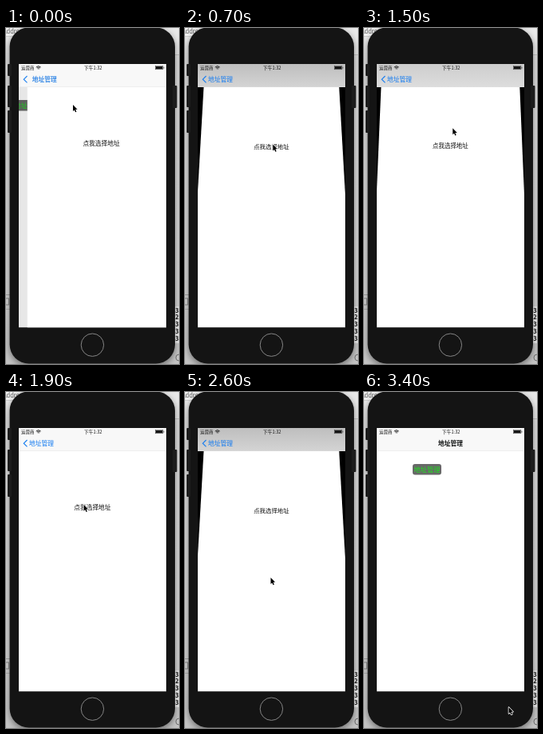
An HTML page with a canvas that plays this animation: 217x420 px, repeating every 3.5 s.

```html
<!DOCTYPE html>
<html lang="zh">
<head>
<meta charset="utf-8">
<style>
html, body { margin: 0; width: 100%; height: 100%; overflow: hidden; background: #dcdcdc; }
canvas { display: block; width: 217px; height: 420px; }
</style>
</head>
<body>
<canvas id="stage"></canvas>
<script>
const W = 217, H = 420, LOOP = 3500, STEP = 100;
const SX = 16, SY = 45, SW = 185, BOTTOM = 374.5, SH = BOTTOM - SY, CX = 108.4, NAV = 74;
const FONT = '"Noto Sans CJK SC", "Noto Sans CJK", sans-serif';
const canvas = document.getElementById('stage');
const ratio = window.devicePixelRatio || 1;
canvas.width = W * ratio;
canvas.height = H * ratio;
const c = canvas.getContext('2d');

const mix = (a, b, k) => a + (b - a) * k;
const clamp = v => Math.min(1, Math.max(0, v));
const smooth = k => k * k * (3 - 2 * k);
const ramp = (t, a, b) => smooth(clamp((t - a) / (b - a)));
const grey = v => `rgb(${[v, v, v].map(Math.round)})`;

// time, x, y of the pointer tip
const path = [
  [0, 84, 96], [100, 85, 98], [500, 110.3, 145.5], [750, 110.3, 145.5],
  [1100, 125, 109.7], [1250, 125, 109.7], [1750, 97.5, 140.7], [1950, 97.5, 140.7],
  [2200, 110.5, 208], [2450, 107.5, 232], [2600, 107.5, 232],
  [2850, 25, 62], [3000, 25, 62], [3400, 181.5, 394]
];

function pointerAt(t) {
  let i = 0;
  while (i < path.length - 2 && t > path[i + 1][0]) i++;
  const [a, x0, y0] = path[i], [b, x1, y1] = path[i + 1];
  const k = ramp(t, a, b);
  return [mix(x0, x1, k), mix(y0, y1, k)];
}

function rect(x, y, w, h, color) {
  c.fillStyle = color;
  c.fillRect(x, y, w, h);
}

function round(x, y, w, h, r, color) {
  c.fillStyle = color;
  c.beginPath();
  c.roundRect(x, y, w, h, r);
  c.fill();
}

function ring(x, y, r, width, color) {
  c.strokeStyle = color;
  c.lineWidth = width;
  c.beginPath();
  c.arc(x, y, r, 0, 7);
  c.stroke();
}

function text(s, x, y, size, color, align = 'center', weight = 400) {
  c.font = `${weight} ${size}px ${FONT}`;
  c.textAlign = align;
  c.textBaseline = 'middle';
  c.fillStyle = color;
  c.fillText(s, x, y);
}

function desktop() {
  const g = c.createLinearGradient(0, 0, 0, H);
  g.addColorStop(0, '#ececec');
  g.addColorStop(0.1, '#dfdfdf');
  g.addColorStop(0.8, '#d6d6d6');
  g.addColorStop(1, '#c4c4c4');
  rect(0, 0, W, H, g);
  rect(0, 0, 30, 10, '#f4f4f4');
  rect(0, 10, 30, 0.7, '#c4c4c4');
  text('Addres', -4, 4.5, 7.5, '#555', 'left');
  rect(190, 0, 27, 33, '#e9e9e9');
  rect(212, 33, 5, 0.8, '#bcbcbc');
  rect(0, 333, 6, 0.8, '#999');
  c.strokeStyle = '#777';
  c.lineWidth = 0.8;
  c.strokeRect(-2, 338, 5.5, 8);
  rect(0, 351, 6, 0.8, '#aaa');
  rect(211, 348, 6, 46, '#ececec');
  ring(217, 412, 4, 0.9, '#666');
}

function phone() {
  c.save();
  c.shadowColor = 'rgba(0,0,0,0.45)';
  c.shadowBlur = 9 * ratio;
  c.shadowOffsetY = 3 * ratio;
  round(4.6, -0.5, 207.4, 420, 24, '#141414');
  c.restore();
  for (const [y, h] of [[45, 15], [72, 27], [103, 28]]) round(2, y, 5, h, 1, '#1c1c1c');
  round(209, 72, 5.5, 28, 1, '#1c1c1c');
  ring(108.4, 396.2, 14.2, 1, '#858585');
  [3, 2, 3, 3, 3].forEach((n, i) => text(n, 212.3, 352.7 + i * 8.8, 7.5, '#111', 'left', 700));
}

function statusBar() {
  text('运营商', 19, 49.5, 5.5, '#111', 'left');
  c.strokeStyle = '#111';
  c.lineWidth = 0.9;
  for (const r of [1.2, 2.7, 4.2]) {
    c.beginPath();
    c.arc(40.7, 52, r, -2.35, -0.79);
    c.stroke();
  }
  text('下午1:32', 109.3, 49.5, 5.7, '#111', 'center', 500);
  c.lineWidth = 0.5;
  c.strokeStyle = '#333';
  c.strokeRect(187.3, 47.6, 9.6, 4.2);
  rect(187.8, 48.1, 8.6, 3.2, '#111');
  rect(197.5, 48.8, 0.8, 1.8, '#333');
}

function navBar(push, shade) {
  const g = c.createLinearGradient(0, SY, 0, NAV);
  g.addColorStop(0, grey(mix(248, 190, shade)));
  g.addColorStop(1, grey(mix(248, 212, shade)));
  rect(SX, SY, SW, NAV - SY, g);
  rect(SX, NAV - 0.4, SW, 0.4, '#dedede');
  statusBar();
  c.globalAlpha = push;
  c.strokeStyle = '#1b7ff0';
  c.lineWidth = 1.2;
  c.beginPath();
  c.moveTo(26.5, 60);
  c.lineTo(22.3, 64.2);
  c.lineTo(26.5, 68.4);
  c.stroke();
  c.globalAlpha = 1 - 3.4 * push * (1 - push);
  const hue = `rgb(${[18, mix(20, 122, push), mix(20, 240, push)].map(Math.round)})`;
  text('地址管理', mix(93, 29, push), 63.8, 7.75, hue, 'left', push > 0.99 ? 400 : 700);
  c.globalAlpha = 1;
}

function homePage(push) {
  const x = SX - 0.3 * SW * push;
  rect(SX, SY, SW, SH, '#fff');
  round(x + 45, 90, 36, 13.5, 3, '#686868');
  text('地址管理', x + 63, 97, 8.3, '#1fe01f');
  rect(SX, SY, SW, SH, `rgba(0,0,0,${0.1 * push})`);
}

function formPage(x, tilt, lift) {
  const halfTop = mix(mix(92.7, 84.9, tilt), 83.2, lift);
  const halfMid = mix(92.7, 83.2, lift);
  const half = y => mix(halfTop, halfMid, (y - NAV) / (210 - NAV));
  const mid = CX + x;
  if (tilt > 0 || lift > 0) rect(SX, SY, SW, SH, '#000');
  c.fillStyle = '#fff';
  c.beginPath();
  c.moveTo(mid - half(SY), SY);
  c.lineTo(mid + half(SY), SY);
  c.lineTo(mid + half(BOTTOM), BOTTOM);
  c.lineTo(mid - half(BOTTOM), BOTTOM);
  c.fill();
  const y = 143.8 + 4 * tilt + 2.6 * lift;
  text('点我选择地址', mid, y, 7.7 * half(y) / 92.7, '#111');
}

function sheet(lift) {
  if (lift <= 0) return;
  rect(SX, SY, SW, SH, `rgba(0,0,0,${0.54 * lift})`);
  const y = mix(BOTTOM, 134.6, lift);
  rect(SX, y, SW, BOTTOM - y, '#fff');
  text('点我返回原界面', 108, y + 98.2, 7.7, '#111');
}

function pointer(t) {
  const [x, y] = pointerAt(t);
  if (t >= 1200 && t < 1300) {
    ring(x, y, 13, 1, '#3c3c3c');
    ring(x, y, 12.2, 0.6, 'rgba(190,190,190,0.6)');
  }
  c.save();
  c.translate(x, y);
  c.scale(0.93, 0.93);
  c.beginPath();
  [[0, 0], [0, 8.6], [1.9, 6.9], [3.3, 10], [4.7, 9.4], [3.4, 6.3], [6, 6.2]]
    .forEach(p => c.lineTo(...p));
  c.closePath();
  c.lineJoin = 'round';
  c.strokeStyle = '#fff';
  c.lineWidth = 1.6;
  c.stroke();
  c.fillStyle = '#000';
  c.fill();
  c.restore();
}

function draw(t) {
  const push = t < 2000 ? 1 - 0.06 * (1 - ramp(t, -60, 200)) / (1 - ramp(0, -60, 200))
                        : 1 - ramp(t, 2840, 3080);
  const tilt = ramp(t, 560, 700) - ramp(t, 1440, 1620) + ramp(t, 1900, 2020) - ramp(t, 2600, 2760);
  const lift = ramp(t, 700, 1000) - ramp(t, 1220, 1440) + ramp(t, 1980, 2180) - ramp(t, 2400, 2590);

  c.setTransform(ratio, 0, 0, ratio, 0, 0);
  desktop();
  phone();
  c.save();
  c.beginPath();
  c.rect(SX, SY, SW, SH);
  c.clip();
  if (push < 1) homePage(push);
  if (push > 0) formPage(SW * (1 - push), tilt, lift);
  navBar(push, Math.max(tilt, lift));
  sheet(lift);
  c.restore();
  pointer(t);
}

const start = performance.now();
function tick() {
  const t = (performance.now() - start) % LOOP;
  draw(Math.floor(t / STEP) * STEP);
  requestAnimationFrame(tick);
}
tick();
</script>
</body>
</html>
```
